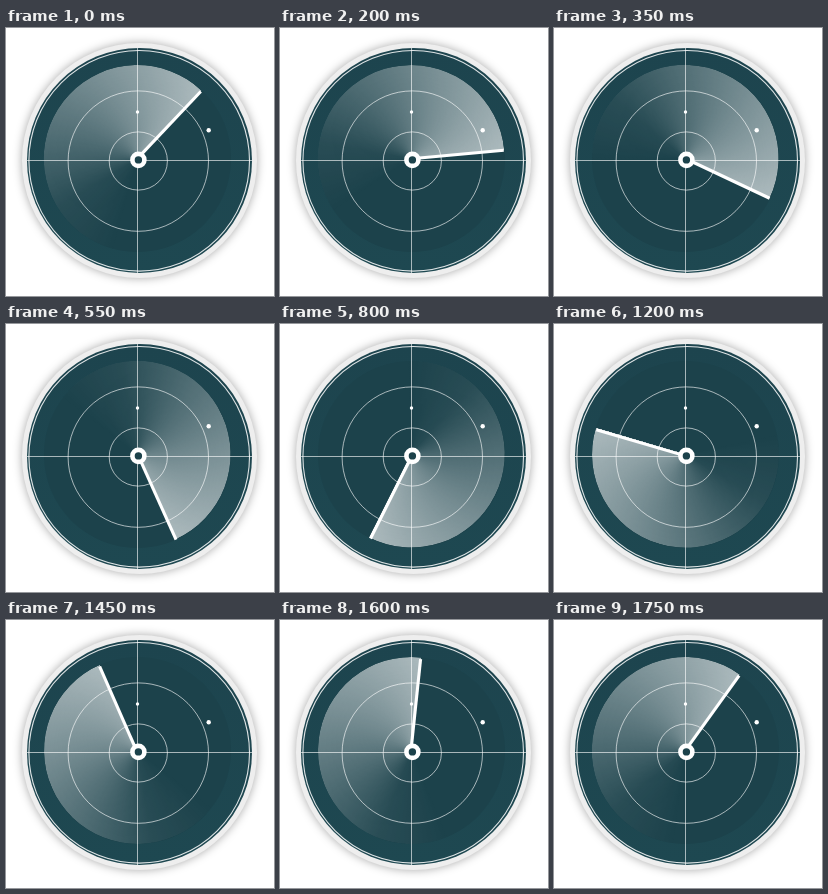
An HTML page for the animation above (1800 ms loop, 268 px wide and 268 px high).

```html
<!DOCTYPE html>
<html lang="en">
<head>
<meta charset="utf-8">
<title>Radar</title>
<style>
  html, body { margin: 0; width: 100%; height: 100%; overflow: hidden; background: #fff; }
  .stage { position: relative; width: 268px; height: 268px; overflow: hidden; }
  .stage > * { position: absolute; }
  .rim {
    left: 15.5px; top: 15px; width: 235px; height: 235px; border-radius: 50%;
    background: #eee; box-shadow: 0 0 10px rgba(0, 0, 0, .34);
  }
  .dial {
    left: 21px; top: 20px; width: 225px; height: 225px; border-radius: 50%;
    background: linear-gradient(#1d444e, #1e4851);
  }
  .scan {
    left: 38px; top: 37.3px; width: 186.6px; height: 186.6px; border-radius: 50%;
    background: #1c424b;
  }
  .sweep {
    position: absolute; inset: 0; border-radius: 50%;
    background: conic-gradient(
      rgba(255, 255, 255, 0) 150deg, rgba(255, 255, 255, .06) 195deg,
      rgba(255, 255, 255, .23) 240deg, rgba(255, 255, 255, .43) 295deg,
      rgba(255, 255, 255, .64) 360deg);
    -webkit-mask: radial-gradient(closest-side, rgba(0, 0, 0, .78), #000);
    mask: radial-gradient(closest-side, rgba(0, 0, 0, .78), #000);
  }
  svg { left: 0; top: 0; }
</style>
</head>
<body>
<div class="stage">
  <div class="rim"></div>
  <div class="dial"></div>
  <div class="scan"><div class="sweep" id="sweep"></div></div>
  <svg width="268" height="268" viewBox="0 0 268 268" fill="none" stroke="#fff">
    <circle cx="133.2" cy="132.8" r="110.3" stroke-width="1.1" stroke-opacity=".85"/>
    <g stroke-width="1" stroke-opacity=".62">
      <path d="M21 132.5H246M131.5 20V245"/>
      <circle cx="132.3" cy="133.1" r="70.2"/>
      <circle cx="132.3" cy="133" r="29.1"/>
    </g>
    <g fill="#fff" stroke="none">
      <circle cx="131.5" cy="84" r="1.7"/>
      <circle cx="202.7" cy="102.2" r="2.2"/>
    </g>
    <path id="hand" d="M130.9 131.3V38.6" stroke-width="3.1"/>
    <circle cx="132.4" cy="131.9" r="6" fill="#1c424b" stroke-width="4.6"/>
  </svg>
</div>
<script>
  const LOOP = 1800, STEP = 50;
  // [time in ms, heading in degrees clockwise from north]
  const keys = [
    [0, 43.4], [200, 84.8], [550, 155.8], [1000, 247.3],
    [1200, 286.4], [1450, 336.3], [1750, 395.7]
  ];
  const sweep = document.getElementById('sweep');
  const hand = document.getElementById('hand');

  function heading(time) {
    const i = Math.max(1, keys.findIndex(key => key[0] >= time));
    const [t0, a0] = keys[i - 1], [t1, a1] = keys[i];
    return a0 + (a1 - a0) * (time - t0) / (t1 - t0);
  }

  function draw(now) {
    const time = Math.floor((now % LOOP) / STEP) * STEP;
    const angle = heading(time);
    sweep.style.transform = `rotate(${angle}deg)`;
    hand.setAttribute('transform', `rotate(${angle} 131.5 131.3)`);
  }

  const start = performance.now();
  function tick() {
    draw(performance.now() - start);
    requestAnimationFrame(tick);
  }
  draw(0);
  requestAnimationFrame(tick);
</script>
</body>
</html>
```
